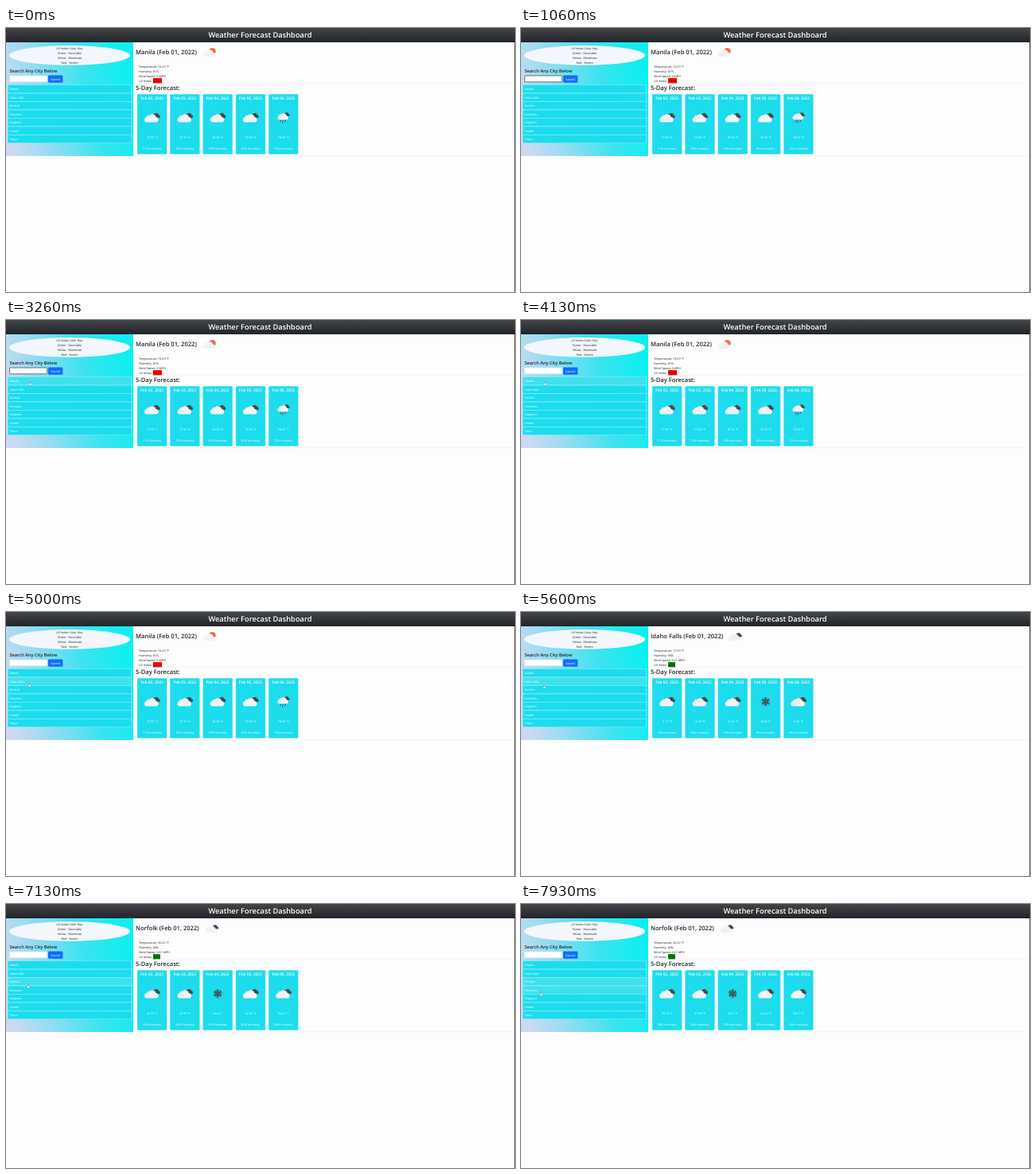
An HTML page for the animation above (8000 ms loop, 640 by 332 pixels).

```html
<!DOCTYPE html>
<html lang="en">
<head>
<meta charset="utf-8">
<title>Weather Forecast Dashboard</title>
<style>
  html, body { margin: 0; height: 100%; overflow: hidden; background: #fdfdfd; }
  svg { display: block; width: 640px; height: 332px; }
  text { font: 3.7px "Open Sans", "Noto Sans", sans-serif; fill: #212529; text-rendering: geometricPrecision; }
  .mid { text-anchor: middle; }
  .light { fill: #fff; }
  .title { font-size: 9.3px; font-weight: 600; }
  .head { font-size: 7.6px; font-weight: 600; }
  .sub { font-size: 5.65px; font-weight: 600; }
  .date { font-size: 4.85px; font-weight: 600; }
</style>
</head>
<body>
<svg viewBox="0 0 640 332">
  <defs>
    <linearGradient id="bar" x2="0" y2="1">
      <stop stop-color="#424649"/><stop offset="1" stop-color="#212529"/>
    </linearGradient>
    <linearGradient id="side" y1=".6" x2="1" y2=".4">
      <stop stop-color="#cbd9f3"/><stop offset=".25" stop-color="#9adcf2"/>
      <stop offset=".65" stop-color="#3be3f0"/><stop offset="1" stop-color="#0ceff0"/>
    </linearGradient>
    <path id="puff" d="M-6.5 6a3.2 3.2 0 0 1-.6-6.3a3 3 0 0 1 3.6-2.4a5 5 0 0 1 8.6 2.2a3.4 3.4 0 0 1 1 6.5z"/>
    <g id="cloud">
      <use href="#puff" fill="#48484a" transform="translate(5.3 -3) scale(.6)"/>
      <use href="#puff" fill="#f2f2f2"/>
    </g>
    <g id="sun">
      <circle cx="4" cy="-2" r="5" fill="#ec6e4c"/>
      <use href="#puff" fill="#f2f2f2"/>
    </g>
    <g id="rain">
      <use href="#cloud" transform="translate(0 -2) scale(.78)"/>
      <path d="M-3 3.5l-1 2M0 3.5l-1.6 3.4M3 3.5l-1 2" stroke="#48484a" stroke-width=".9" stroke-linecap="round"/>
    </g>
    <path id="arm" d="M0 0V-5.5M-1.7-5L0-3.4L1.7-5M-1.7-3L0-1.5L1.7-3"/>
    <g id="snow" fill="none" stroke="#48484a" stroke-width="1"></g>
  </defs>

  <rect width="640" height="332" fill="#fdfdfd"/>
  <path d="M160 69.3H640M160 160.8H640" stroke="#e4e4e6" stroke-width=".5"/>
  <rect y="18" width="160" height="143" fill="url(#side)"/>
  <rect width="640" height="18" fill="url(#bar)"/>
  <rect x="639.2" y="18" width=".8" height="314" fill="#555"/>
  <text class="title mid light" x="319.5" y="12.2">Weather Forecast Dashboard</text>

  <ellipse cx="80" cy="34.4" rx="76" ry="12.4" fill="#f3f6fd"/>
  <g id="key"></g>
  <text class="sub" x="4.4" y="56.3">Search Any City Below</text>
  <rect id="field" x="4.6" y="60" width="47" height="7.8" rx=".6" fill="#fff" stroke-width=".8"/>
  <rect x="53" y="59.4" width="18.4" height="9.4" rx="1.3" fill="#0d6efd"/>
  <text class="mid light" x="62.2" y="65.5">Submit</text>
  <g id="list"></g>

  <g id="panel"></g>
  <g id="hand" stroke="#333" stroke-width=".3" fill="#fff">
    <path d="M-.6-2.2q.5-.7 1 0v1.5l1.5.4q.5.2.4.8l-.4 1.7h-2.2l-1.5-1.9q.2-.6 1.2 0z"/>
  </g>
</svg>
<script>
const LOOP = 8000;
const $ = id => document.getElementById(id);
const text = (x, y, s, cls = '') => `<text x="${x}" y="${y}" class="${cls}">${s}</text>`;
const icon = (name, x, y, k = 1) => `<use href="#${name}" transform="translate(${x} ${y}) scale(${k})"/>`;

const names = ['Manila', 'Idaho Falls', 'Norfolk', 'Honolulu', 'Waipahu', 'Seattle', 'Tokyo'];
const cities = [
  { from: 0, name: 'Manila', icon: 'sun', iconX: 256, now: ['74.59', '81', '3', '10.51'], uv: '#f00', uvW: 11,
    temps: ['77.95', '77.92', '78.53', '78.76', '78.65'], hum: [71, 70, 69, 65, 72],
    icons: ['cloud', 'cloud', 'cloud', 'cloud', 'rain'] },
  { from: 5260, name: 'Idaho Falls', icon: 'cloud', iconX: 269, now: ['17.69', '84', '3.21', '0.86'], uv: '#008000', uvW: 9,
    temps: ['-0.17', '-0.47', '-0.16', '8.48', '5.66'], hum: [99, 94, 99, 98, 96],
    icons: ['cloud', 'cloud', 'cloud', 'snow', 'cloud'] },
  { from: 6800, name: 'Norfolk', icon: 'cloud', iconX: 258.5, now: ['30.22', '84', '4.61', '0.76'], uv: '#008000', uvW: 9,
    temps: ['35.73', '37.99', '28.4', '34.62', '36.61'], hum: [98, 94, 95, 82, 93],
    icons: ['cloud', 'cloud', 'snow', 'cloud', 'cloud'] }
];

// time, x, y of the pointer
const path = [[2660, 40, 66], [3260, 30, 80], [4530, 30, 80], [5000, 29, 92], [5400, 29, 94], [5800, 29, 94],
  [6330, 28, 103], [7000, 28, 103], [7600, 26, 110], [7930, 25, 113], [LOOP, 25, 113]];
// time, highlighted rows
const lit = [[0], [3000, 0], [4700, 1], [6000, 2], [7500, 2, 3]];

$('key').innerHTML = ['UV Index Color Key:', 'Green - Favorable', 'Yellow - Moderate', 'Red - Severe']
  .map((s, i) => text(80, 27 + 6 * i, s, 'mid')).join('');
$('snow').innerHTML = [0, 60, 120, 180, 240, 300]
  .map(a => `<use href="#arm" transform="rotate(${a})"/>`).join('');
$('list').innerHTML = names.map((s, i) => {
  const y = 71.7 + 10.45 * i;
  return `<rect x="2.2" y="${y}" width="155.6" height="10.2" fill="#1cdcee" stroke="#8feef5" stroke-width=".5"/>`
    + text(4.6, y + 6.6, s, 'light');
}).join('');
const rows = $('list').querySelectorAll('rect');

function panel(c) {
  const [temp, hum, wind, uv] = c.now;
  const lines = [`Temperature: ${temp} °F`, `Humidity: ${hum}%`, `Wind Speed: ${wind} MPH`, 'UV Index:'];
  const cards = c.temps.map((t, i) => {
    const x = 165 + 41.3 * i, mid = x + 18.6;
    return `<rect x="${x}" y="83.2" width="37.3" height="75.6" rx="1.2" fill="#1cdcee" stroke="#b5e9ee" stroke-width=".4"/>`
      + text(mid, 90.4, `Feb 0${i + 2}, 2022`, 'date mid light')
      + icon(c.icons[i], mid, 112.6)
      + text(mid, 139.2, t + ' °F', 'mid light')
      + text(mid, 153.4, c.hum[i] + '% humidity', 'mid light');
  });
  return text(163, 32.8, c.name + ' (Feb 01, 2022)', 'head')
    + icon(c.icon, c.iconX, 31, .86)
    + lines.map((s, i) => text(167, 50 + 6 * i, s)).join('')
    + `<rect x="185" y="63" width="${c.uvW}" height="6.4" fill="${c.uv}"/>`
    + text(185 + c.uvW / 2, 67.8, uv, 'mid')
    + text(163, 77.8, '5-Day Forecast:', 'head')
    + cards.join('');
}

function pointer(t) {
  const i = Math.max(1, path.findIndex(p => p[0] > t));
  const [t0, x0, y0] = path[i - 1], [t1, x1, y1] = path[i];
  const k = (t - t0) / (t1 - t0), e = k * k * (3 - 2 * k);
  return [x0 + (x1 - x0) * e, y0 + (y1 - y0) * e];
}

let shown;
function draw(t) {
  const city = cities.findLast(c => c.from <= t);
  if (city !== shown) $('panel').innerHTML = panel(shown = city);
  const on = lit.findLast(l => l[0] <= t).slice(1);
  rows.forEach((r, i) => r.setAttribute('fill', on.includes(i) ? '#3fe1ec' : '#1cdcee'));
  $('field').setAttribute('stroke', t > 800 && t < 3900 ? '#4a5560' : '#d5eaf2');
  const moving = t >= path[0][0];
  $('hand').setAttribute('visibility', moving ? 'visible' : 'hidden');
  if (moving) $('hand').setAttribute('transform', `translate(${pointer(t)})`);
}

const start = performance.now();
function tick() {
  draw((performance.now() - start) % LOOP);
  requestAnimationFrame(tick);
}
tick();
</script>
</body>
</html>
```
